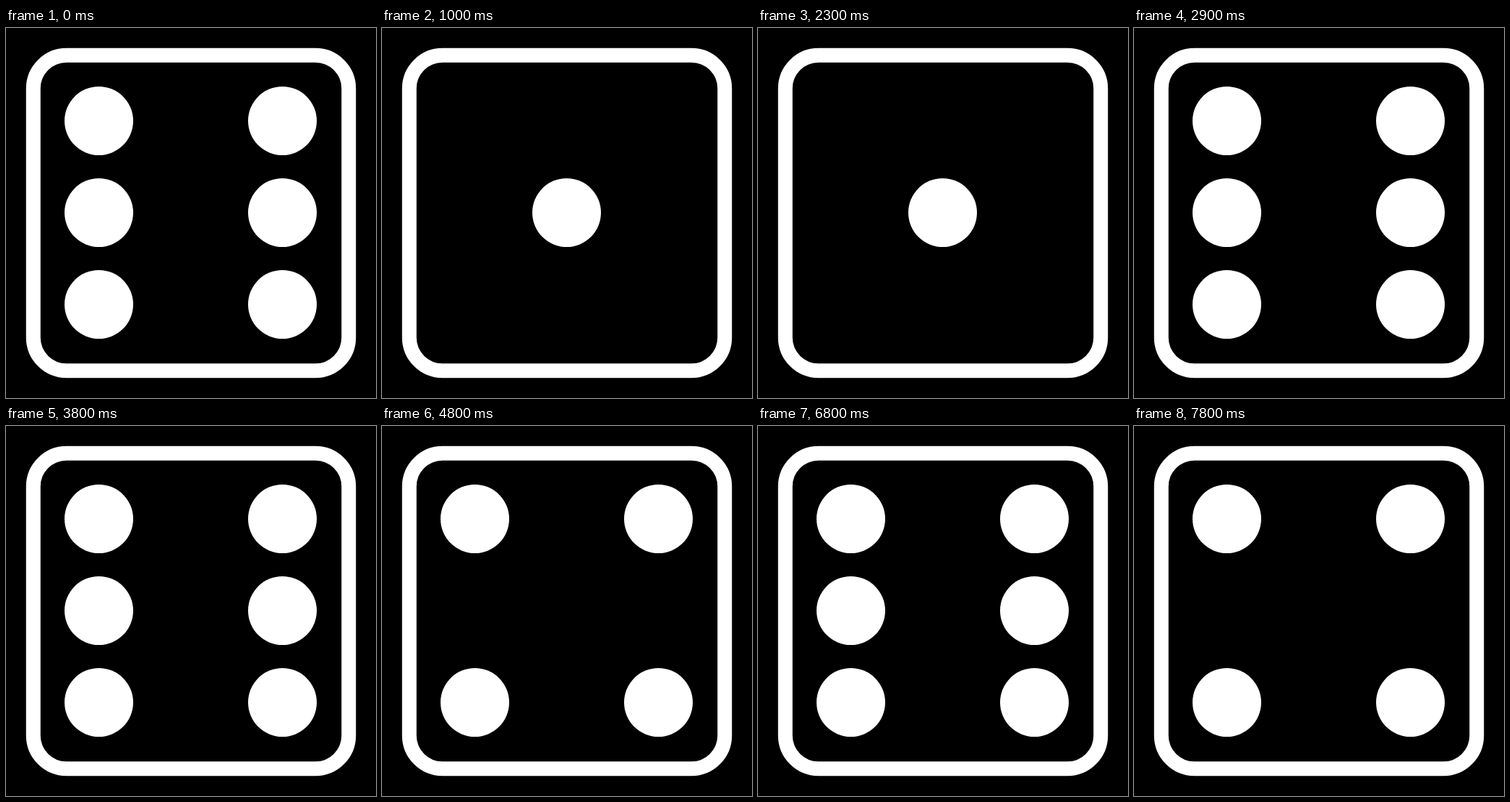
An HTML page that plays this animation: 512 by 512 pixels, repeating every 8.3 s.

```html
<!DOCTYPE html>
<html lang="en">
<head>
<meta charset="utf-8">
<title>Rolling die</title>
<style>
  html, body { margin: 0; width: 100%; height: 100%; overflow: hidden; background: #000; }
  svg { display: block; width: 100vw; height: 100vh; }
  .pip { fill: #fff; }
</style>
</head>
<body>
<svg viewBox="0 0 512 512">
  <rect x="37.75" y="37.75" width="436.5" height="436.5" rx="46" fill="none" stroke="#fff" stroke-width="20"/>
  <g id="pips"></g>
</svg>
<script>
  // Pips sit on a 3 x 3 grid, numbered row by row from the top left.
  const FACES = {
    1: [4],
    2: [2, 6],
    3: [0, 4, 8],
    4: [0, 2, 6, 8],
    5: [0, 2, 4, 6, 8],
    6: [0, 2, 3, 5, 6, 8]
  };
  const SLOW = 500, FAST = 200;
  const PHASES = [
    { hold: SLOW, rolls: [6, 5, 1] },
    { hold: FAST, rolls: [5, 3, 1, 4, 1, 5, 3, 6, 4] },
    { hold: SLOW, rolls: [2, 6, 2, 4, 5, 3, 2, 6, 2, 4] }
  ];
  const LOOP = PHASES.reduce((sum, p) => sum + p.hold * p.rolls.length, 0);

  const group = document.getElementById('pips');
  const pips = Array.from({ length: 9 }, (_, i) => {
    const pip = document.createElementNS(group.namespaceURI, 'circle');
    pip.setAttribute('class', 'pip');
    pip.setAttribute('cx', 128.5 + 127 * (i % 3));
    pip.setAttribute('cy', 128.5 + 127 * Math.floor(i / 3));
    pip.setAttribute('r', 47.5);
    group.append(pip);
    return pip;
  });

  function faceAt(time) {
    for (const { hold, rolls } of PHASES) {
      const index = Math.floor(time / hold);
      if (index < rolls.length) return rolls[index];
      time -= hold * rolls.length;
    }
  }

  function show(face) {
    pips.forEach((pip, i) => {
      pip.style.visibility = FACES[face].includes(i) ? 'visible' : 'hidden';
    });
  }

  const start = performance.now();
  function draw(now) {
    show(faceAt(Math.max(0, now - start) % LOOP));
    requestAnimationFrame(draw);
  }
  draw(start);
</script>
</body>
</html>
```
